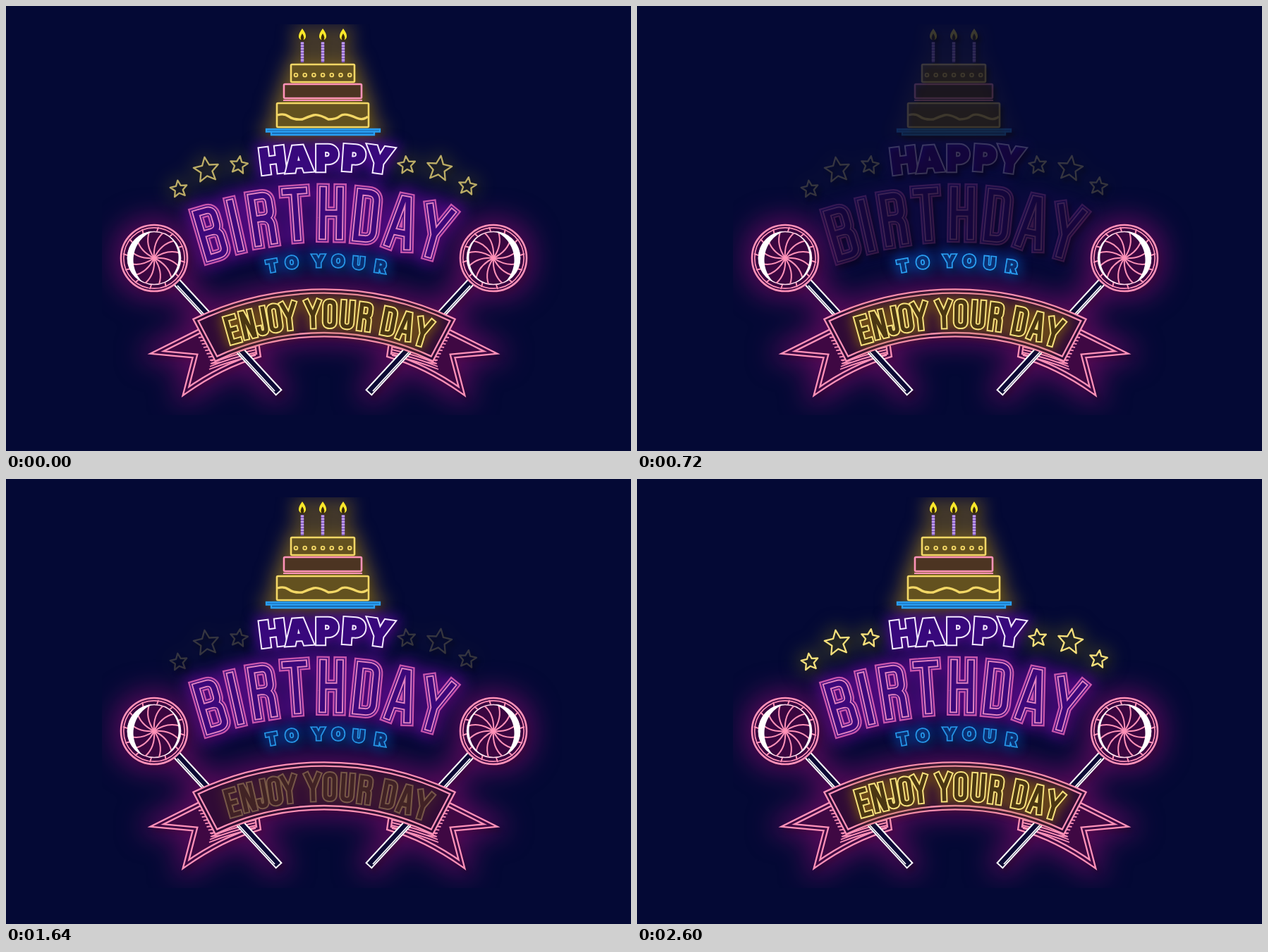
Recreate the animation shown at these times as an HTML page. Size 886 px wide and 632 px high, loop 3 s.

```html
<!DOCTYPE html>
<html lang="en">
<head>
<meta charset="utf-8">
<title>Neon birthday sign</title>
<style>
html, body { margin: 0; width: 100%; height: 100%; overflow: hidden; background: #040935; }
svg { display: block; width: 886px; height: 632px; }
text { font-family: Inter, "Open Sans", sans-serif; font-weight: 900; text-anchor: middle; }
</style>
</head>
<body>
<svg id="sign" viewBox="0 0 886 632" fill="none"></svg>
<script>
const LOOP = 3000, STEP = 40, CUT = 80, DIM = 0.2;
const PINK = '#ff92b8', YELLOW = '#f6e07c', BLUE = '#2a9ff2', WHITE = '#fff';

// Letter skeletons, 66 units high and centred on the origin.
const GLYPHS = {
  A: 'M-14 33L-3-33H3L14 33M-9 15H9',
  B: 'M-12-33H2Q12-33 12-23V-12Q12-2 2-2H-12M2-2Q13-2 13 8V23Q13 33 2 33H-12V-33',
  D: 'M-12-33H0Q12-33 12-21V21Q12 33 0 33H-12Z',
  E: 'M10-33H-10V33H10M-10 0H7',
  H: 'M-12-33V33M12-33V33M-12 0H12',
  I: 'M0-33V33',
  J: 'M9-33V21Q9 33-1 33Q-10 33-10 21V19',
  N: 'M-12 33V-33H-9L9 33H12V-33',
  O: 'M0-33Q12-33 12-21V21Q12 33 0 33Q-12 33-12 21V-21Q-12-33 0-33Z',
  R: 'M-12 33V-33H2Q12-33 12-23V-11Q12-1 2-1H-12M0-1Q11 0 11 12V33',
  T: 'M-13-33H13M0-33V33',
  U: 'M-12-33V21Q-12 33 0 33Q12 33 12 21V-33',
  Y: 'M-16-33L0 4 16-33M0 4V33'
};

const path = (d, stroke, width, extra = '') =>
  `<path d="${d}" stroke="${stroke}" stroke-width="${width}" ${extra}/>`;
const nested = (d, layers, extra) => layers.map(([w, c]) => path(d, c, w, extra)).join('');
const place = (x, y, angle, scale, body) =>
  `<g transform="translate(${x} ${y}) rotate(${angle}) scale(${scale})">${body}</g>`;

// Letters whose centres sit on a circle around (cx, cy).
function arch(word, xs, cx, cy, radius, scale, layers) {
  return [...word].map((ch, i) => {
    const dx = xs[i] - cx;
    const angle = Math.asin(dx / radius) * 180 / Math.PI * 0.8;
    const y = cy - Math.sqrt(radius * radius - dx * dx);
    return place(xs[i], y, angle, scale, nested(GLYPHS[ch], layers, 'stroke-linecap="square"'));
  }).join('');
}

// Text thickened by an outline of the given width, with a plain inside.
function lettering(size, fill, stroke, bold, line, letters) {
  const layer = (ch, color, width) =>
    `<text y="${size * 0.364}" font-size="${size}" fill="${color}" stroke="${color}" stroke-width="${width}">${ch}</text>`;
  return letters.map(([ch, x, y, angle]) =>
    place(x, y, angle, 1, layer(ch, stroke, bold) + layer(ch, fill, bold - 2 * line))).join('');
}

function star(x, y, r, turn) {
  const points = Array.from({ length: 10 }, (_, i) => {
    const a = (i * 36 + turn - 90) * Math.PI / 180, q = i % 2 ? r * 0.46 : r;
    return `${(x + q * Math.cos(a)).toFixed(1)} ${(y + q * Math.sin(a)).toFixed(1)}`;
  });
  return path(`M${points.join('L')}Z`, YELLOW, 2.3, 'stroke-linejoin="round"');
}

function lollipop() {
  let spokes = '';
  for (let a = 0; a < 360; a += 30) {
    spokes += `<g transform="rotate(${a})">${path('M0 0Q19-13 37-7M38 4L44 6', PINK, 2)}</g>`;
  }
  return `<circle r="47" fill="#3a0640" stroke="${PINK}" stroke-width="2.6"/>
    <circle r="43.2" stroke="${PINK}" stroke-width="1.7"/>
    <circle r="37.5" stroke="#ffd9e8" stroke-width="1.7"/>${spokes}
    <path fill="${WHITE}" d="M-2-38A38 38 0 0 0-16 34.5A44 44 0 0 1-2-38ZM20-32A38 38 0 0 1 12 36A41 41 0 0 0 20-32Z"/>`;
}

function cloth(d, fill) {
  return path(d, PINK, 7.6, `fill="${fill}"`) + path(d, fill, 3);
}

function sweets() {
  let pleats = '';
  for (let i = 0; i < 9; i++) {
    const y = 471 + i * 4.6, edge = 281 + i * 2.3;
    pleats += path(`M${edge - 8} ${y}L${edge + 5} ${y - 2}`, PINK, 1.8);
  }
  for (let i = 0; i < 4; i++) {
    pleats += path(`M${288 + i} ${516 - i * 4}Q318 ${504 - i * 4} 354 ${496 - i * 4}`, PINK, 1.8);
  }
  const half = cloth('M276 461L214 492 268 497 255 547Q306 511 358 496L356 482', '#3f0843') + pleats +
    nested('M243 393L383 545', [[12.5, WHITE], [8.4, '#0d0a35']], 'stroke-linecap="square"') +
    path('M243 397L381 547', WHITE, 1.8) + place(210, 358, 0, 1, lollipop());
  return `<g id="half">${half}</g><use href="#half" transform="matrix(-1 0 0 1 901 0)"/>` +
    cloth('M269 446A425 425 0 0 1 633 446L604 501A358 358 0 0 0 298 501Z', '#300b36');
}

function cake() {
  const gold = '#f3d766', sponge = '#63511f';
  let parts = '';
  for (const x of [420, 449, 478]) {
    parts += path(`M${x} 51V80`, '#8a62c8', 4.4) +
      path(`M${x} 52V80`, '#d3b4f4', 4.4, 'stroke-dasharray="1.4 2.6"') +
      `<path fill="#fbe82a" d="M${x} 32Q${x + 9} 44 ${x + 2} 48H${x - 2}Q${x - 9} 44 ${x} 32Z"/>
       <path fill="#3a2a08" d="M${x} 39Q${x + 4} 45 ${x + 1} 49H${x - 1}Q${x - 4} 45 ${x} 39Z"/>`;
  }
  const tier = (x, y, w, h, color, fill) =>
    `<rect x="${x}" y="${y}" width="${w}" height="${h}" rx="1.5" fill="${fill}" stroke="${color}" stroke-width="2.6"/>`;
  parts += tier(404, 83, 90, 25, gold, sponge) + tier(394, 111, 110, 20, PINK, '#4c3422') +
    path('M393 134H505', PINK, 2.2) + tier(384, 138, 130, 34, gold, sponge);
  for (let i = 0; i < 7; i++) {
    parts += `<circle cx="${411 + i * 12.7}" cy="98" r="2.4" stroke="${gold}" stroke-width="1.9"/>`;
  }
  parts += path('M385 155Q394 152 401 157T420 161Q429 157 436 155T457 161Q468 161 474 156T497 159Q506 163 513 157', gold, 3.4);
  return parts + path('M369 175H530V178.5H369ZM376 179V183H522V179', BLUE, 2.3, 'fill="#1566ae"');
}

const shine = '#3c0a7c';
// Levels are [time, brightness] pairs that hold after the cut to dark.
const parts = [
  { id: 'cake', art: cake(), glow: ['#a8841a', 5, 13, 0.66], start: 1,
    levels: [[1200, 0], [1440, 1]] },
  { id: 'birthday', glow: ['#6c0a9c', 5, 10, 0.8], start: 0.85,
    art: arch('BIRTHDAY', [290, 325, 364, 411, 461, 511, 561, 608], 452, 761, 467, 1,
      [[18.6, '#dd62b6'], [14, shine], [11, '#f793cc'], [7, shine]]),
    levels: [[740, 0], [960, 1], [1080, 1], [1240, 0.85], [1880, 0.85], [2000, 0.45], [2080, 0.1], [2200, 0.1], [2400, 0.85]] },
  { id: 'happy', glow: ['#5a0aa0', 4, 9, 0.78], start: 1,
    art: lettering(49, '#38087c', '#f4eaff', 6.4, 2, [['H', 378, 219, -7], ['A', 415, 217, -4],
      ['P', 455, 216, 0], ['P', 493, 216, 4], ['Y', 529, 218, 8]]),
    levels: [[1020, 0], [1240, 1]] },
  { id: 'stars', glow: ['#5c5a18', 5, 12, 0.5], start: 0.68,
    art: star(245, 260, 12.5, -8) + star(284, 233, 18.5, -8) + star(330, 226, 13, 8) +
      star(568, 226, 13, -6) + star(614, 231, 18.5, 8) + star(654, 256, 13, 8),
    levels: [[880, 0], [1000, 0.65], [1080, 1], [1400, 1], [1560, 0], [1720, 0], [1920, 1], [2400, 1], [2500, 0.5], [2600, 1]] },
  { id: 'sweets', art: sweets(), glow: ['#800a6c', 8, 19, 0.68], start: 1,
    levels: [[240, 0], [680, 1]] },
  { id: 'toyour', glow: ['#0b58c8', 3, 8, 0.6], start: 0.9,
    art: lettering(23, '#0b2f72', BLUE, 4.4, 1.8, [['T', 377, 369, -10], ['O', 405, 364, -6],
      ['Y', 443, 362, -1], ['O', 471, 362, 2], ['U', 500, 365, 5], ['R', 531, 370, 9]]),
    levels: [[440, 0], [680, 1], [800, 1], [960, 0.9], [1880, 0.9], [2000, 0.45], [2080, 0.1], [2200, 0.1], [2400, 0.9]] },
  { id: 'enjoy', glow: ['#8a6a08', 3, 8, 0.65], start: 1,
    art: arch('ENJOYYOURDAY', [321, 343, 362, 381, 401, 435, 459, 484, 509, 543, 567, 591], 451, 825, 388, 0.52,
      [[18.6, YELLOW], [10.8, '#4a3612']]),
    levels: [[440, 0], [680, 1], [1440, 1], [1600, 0.1], [1680, 0.2], [1840, 1]] }
];

const filter = (id, body) =>
  `<filter id="${id}" filterUnits="userSpaceOnUse" x="136" y="26" width="652" height="555" color-interpolation-filters="sRGB">${body}</filter>`;
const halo = ([color, grow, blur, alpha]) =>
  `<feMorphology in="SourceAlpha" operator="dilate" radius="${grow}"/><feGaussianBlur stdDeviation="${blur}" result="b"/>
   <feFlood flood-color="${color}" flood-opacity="${alpha}"/><feComposite in2="b" operator="in"/>`;

const sign = document.getElementById('sign');
sign.innerHTML = `<rect width="886" height="632" fill="#040935"/><defs>` +
  filter('shadow', '<feOffset in="SourceAlpha" dx="4" dy="5"/><feGaussianBlur stdDeviation="3"/>') +
  parts.map(p => filter(`${p.id}-halo`, halo(p.glow)) + `<g id="${p.id}">${p.art}</g>`).join('') + '</defs>' +
  parts.map(p => `<use href="#${p.id}" filter="url(#shadow)" opacity="0.4"/>
    <g id="${p.id}-glow"><use href="#${p.id}" filter="url(#${p.id}-halo)"/></g>`).join('') +
  parts.map(p => `<g id="${p.id}-lit"><use href="#${p.id}"/></g>`).join('');

// The yellow lettering glows on top of the banner.
sign.insertBefore(document.getElementById('enjoy-glow'), document.getElementById('enjoy-lit'));

for (const p of parts) {
  p.glowNode = document.getElementById(`${p.id}-glow`);
  p.litNode = document.getElementById(`${p.id}-lit`);
}

function brightness({ start, levels }, t) {
  if (t < CUT) return start;
  const next = levels.findIndex(([time]) => time > t);
  if (next === 0) return levels[0][1];
  if (next < 0) return levels[levels.length - 1][1];
  const [t0, a] = levels[next - 1], [t1, b] = levels[next];
  return a + (b - a) * (t - t0) / (t1 - t0);
}

function draw(t) {
  for (const p of parts) {
    const level = brightness(p, t);
    p.glowNode.setAttribute('opacity', 0.12 + 0.88 * level);
    p.litNode.setAttribute('opacity', DIM + (1 - DIM) * level);
  }
}

const begin = performance.now();
function tick() {
  const t = (performance.now() - begin) % LOOP;
  draw(Math.floor(t / STEP) * STEP);
  requestAnimationFrame(tick);
}
draw(0);
requestAnimationFrame(tick);
</script>
</body>
</html>
```
